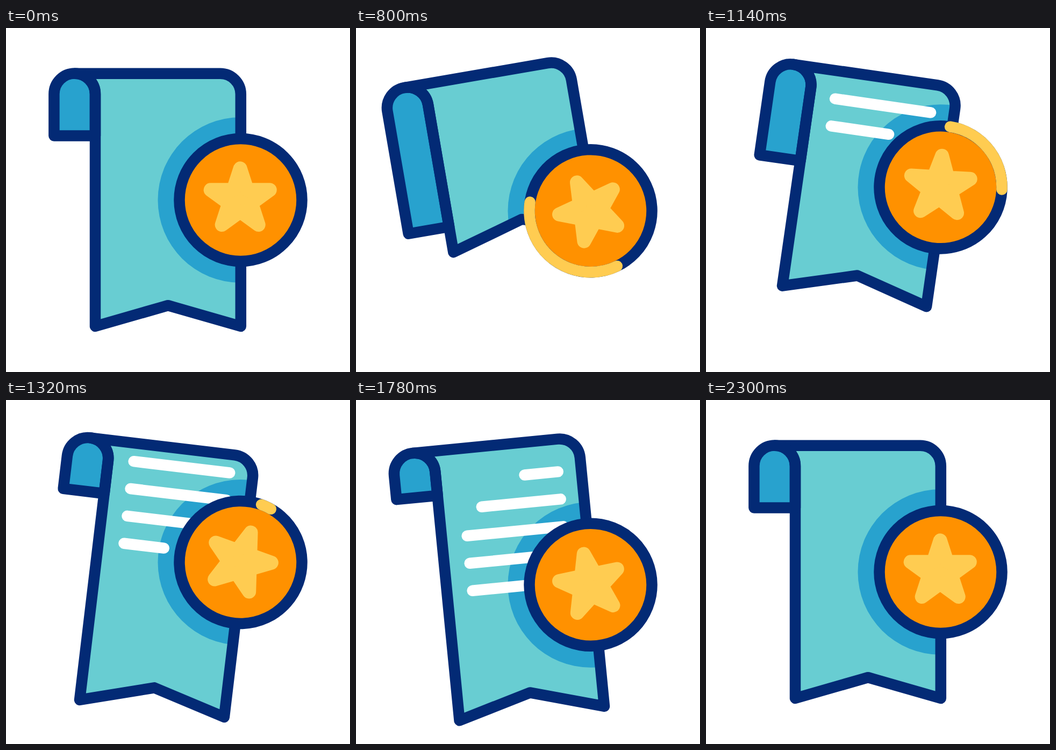
An HTML page that plays this animation: 640 by 640 pixels, repeating every 2400 ms.

```html
<!DOCTYPE html>
<html lang="en">
<head>
<meta charset="utf-8">
<title>Bookmark badge</title>
<style>
  html, body { margin: 0; width: 100%; height: 100%; overflow: hidden; background: #fff; }
  svg { display: block; width: 100%; height: 100%; }
  .line { fill: none; stroke-width: 20.5; stroke-linecap: round; stroke-linejoin: round; }
  .navy { stroke: #032a75; }
  .gold { stroke: #ffcc51; }
  .white { stroke: #fff; }
</style>
</head>
<body>
<svg viewBox="0 0 640 640">
  <defs>
    <clipPath id="clip"><path id="clipShape"/></clipPath>
  </defs>
  <g id="ribbon">
    <path id="body" fill="#68cdd2"/>
    <path id="curl" fill="#28a2ce"/>
  </g>
  <g id="haloClip" clip-path="url(#clip)">
    <circle id="halo" cx="436.5" r="154" fill="#28a2ce"/>
  </g>
  <g id="ink">
    <path id="text" class="line white"/>
    <path id="bodyEdge" class="line navy"/>
    <path id="curlEdge" class="line navy"/>
  </g>
  <g id="medal">
    <circle r="114" class="line navy" style="fill:#ff9100"/>
    <path id="star" class="gold" fill="#ffcc51" stroke-width="26" stroke-linejoin="round"/>
    <path id="spark" class="line gold"/>
  </g>
</svg>
<script>
const LOOP = 2400;
const $ = id => document.getElementById(id);
const set = (id, name, value) => $(id).setAttribute(name, value);

// Keyframes: [time, value], eased in and out between neighbours
const TILT = [[200, 0], [700, -12], [1200, 9], [1700, -6], [2200, 0]];
const DROP = [[200, 0], [700, 25.6], [1200, -25.6], [1700, 25.6], [2200, 0]];
const SPIN = [[200, 0], [800, -25], [1400, 22], [1800, -12], [2300, 0]];
const ROLL = [[200, 0], [820, 153.6], [1500, -51.2], [2200, 0]];
const TEXT_Y = [[800, 161.5], [1500, 110.3], [1950, 161.5]];
const HEAD = [[400, 0], [1200, 360]];
const TAIL = [[600, 0], [1400, 360]];

const ease = p => p * p * (3 - 2 * p);

function at(keys, t) {
  if (t <= keys[0][0]) return keys[0][1];
  for (let i = 1; i < keys.length; i++) {
    const [t0, a] = keys[i - 1], [t1, b] = keys[i];
    if (t < t1) return a + (b - a) * ease((t - t0) / (t1 - t0));
  }
  return keys[keys.length - 1][1];
}

function polar(radius, deg) {
  const a = deg * Math.PI / 180;
  return (radius * Math.sin(a)).toFixed(2) + ' ' + (-radius * Math.cos(a)).toFixed(2);
}

function bodyPath(roll) {
  const tip = 555 - roll, notch = 516.2 - roll;
  return `M127.8 84.7H398.6A38.2 38.2 0 0 1 436.8 122.9V${tip}L301.4 ${notch}L166 ${tip}V122.9A38.2 38.2 0 0 0 127.8 84.7Z`;
}

function curlPath(roll) {
  return `M89.4 ${200.6 + roll}V122.9A38.3 38.3 0 0 1 166 122.9V${200.6 + roll}Z`;
}

function textPath(t) {
  const top = at(TEXT_Y, t);
  let d = '';
  for (let i = 0; i < 5; i++) {
    const wait = i * 100;
    const end = at([[950, 213.5], [1110, 393.3]], t - wait);
    const start = at([[1600, 213.5], [1900, 393.3]], t - wait);
    if (end - start > 0.01) d += `M${start} ${top + i * 51.2}H${end}`;
  }
  return d;
}

function sparkPath(t) {
  const head = at(HEAD, t), tail = at(TAIL, t);
  if (head - tail < 0.01) return '';
  return `M${polar(114, -tail)}A114 114 0 0 0 ${polar(114, -head)}`;
}

function draw(t) {
  const roll = at(ROLL, t);
  const y = 320 + at(DROP, t);
  const tilt = `rotate(${at(TILT, t)} 263 320)`;
  const body = bodyPath(roll), curl = curlPath(roll);

  for (const id of ['ribbon', 'ink', 'clipShape']) set(id, 'transform', tilt);
  for (const id of ['body', 'bodyEdge', 'clipShape']) set(id, 'd', body);
  for (const id of ['curl', 'curlEdge']) set(id, 'd', curl);

  set('halo', 'cy', y);
  set('text', 'd', textPath(t));
  set('medal', 'transform', `translate(436.5 ${y}) rotate(${at(SPIN, t)})`);
  set('spark', 'd', sparkPath(t));
}

const points = Array.from({ length: 10 }, (_, i) => polar(i % 2 ? 22.1 : 57.9, i * 36));
set('star', 'd', 'M' + points.join('L') + 'Z');
set('star', 'transform', 'translate(-0.8 -0.8)');

const begin = performance.now();
function tick() {
  draw((performance.now() - begin) % LOOP);
  requestAnimationFrame(tick);
}
draw(0);
requestAnimationFrame(tick);
</script>
</body>
</html>
```
